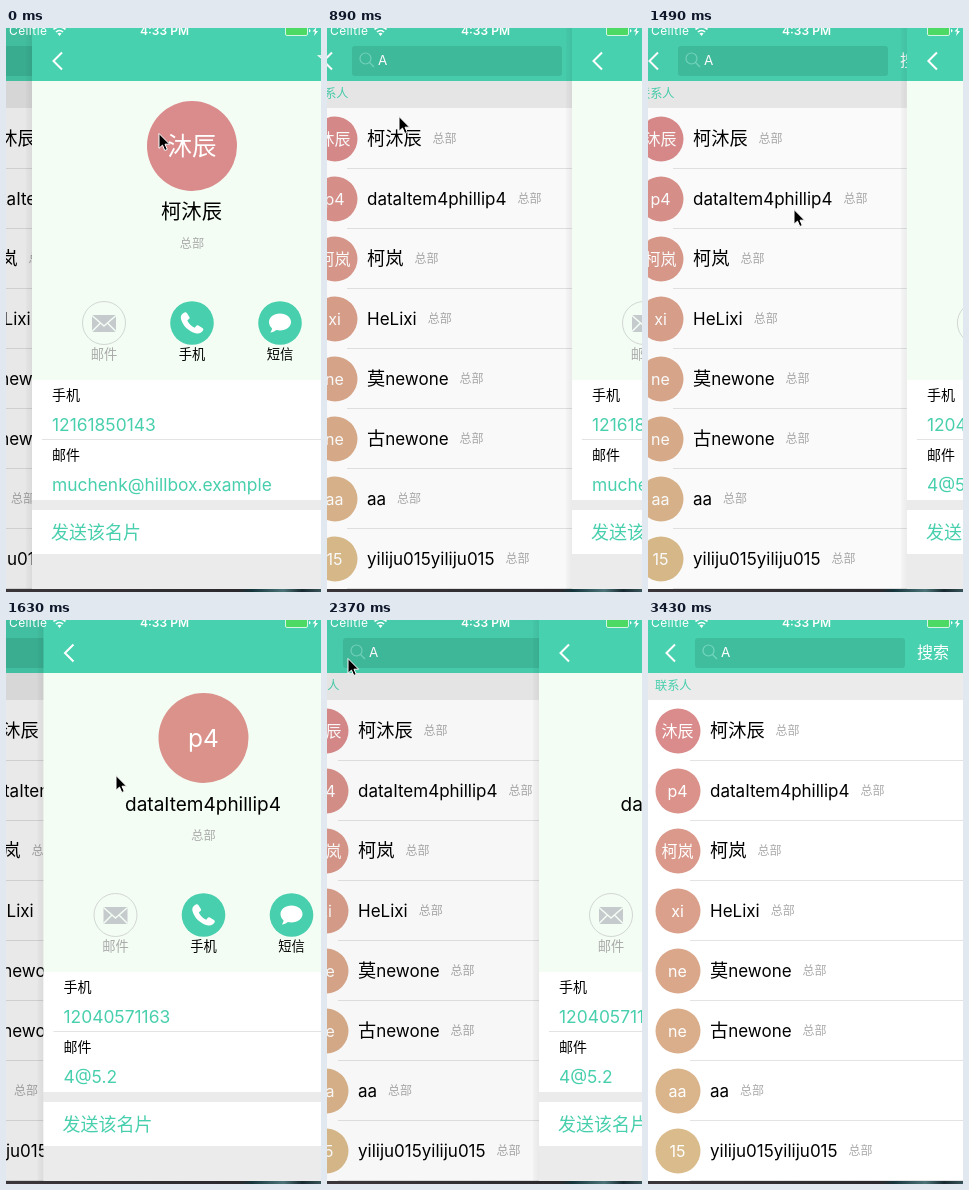
An HTML page that plays this animation: 315 px wide and 564 px high, repeating every 3530 ms.

```html
<!DOCTYPE html>
<html lang="zh-CN">
<head>
<meta charset="utf-8">
<title>联系人</title>
<style>
  html, body { margin: 0; width: 100%; height: 100%; overflow: hidden; }
  body { font-family: Inter, "Noto Sans CJK SC", "Noto Sans CJK", sans-serif; background: #343034; }
  #stage { position: absolute; left: 0; top: 0; width: 315px; height: 564px; overflow: hidden;
    background: linear-gradient(90deg, #3b3639, #2b292d 74%, #14343b 78%, #4b7478 88%, #17292f 94%, #38535a); }
  #screen { position: absolute; inset: 0 0 3px; overflow: hidden; background: #fff; }
  .page { position: absolute; left: 0; top: 0; width: 317px; height: 561px; }
  .box, .t, .page svg { position: absolute; }
  .t { line-height: 1; white-space: nowrap; transform: translateY(-50%); }
  .mid { transform: translate(-50%, -50%); }
  b { font-weight: 400; font-size: 1.07em; line-height: 0; }
  .bar { left: -3px; right: 0; top: 0; height: 53px; background: #48d1af; }
  .teal { color: #48cfad; }
  .grey { color: #aaa; }
  .white { color: #fff; }
  .disc { border-radius: 50%; transform: translate(-50%, -50%); color: #fff;
    display: flex; align-items: center; justify-content: center; line-height: 1; }
  .row .t { display: flex; align-items: center; gap: 11px; left: 62px; font-size: 17px; }
  .row small { font-size: 12px; color: #aaa; }
  .row .disc { left: 29.5px; width: 45px; height: 45px; font-size: 16px; }
  .line { height: 1px; right: 0; background: #e3e3e5; }
  #dim { inset: 0 0 0 -3px; background: #000; }
  #detail::before { content: ""; position: absolute; left: -9px; width: 6px; top: 0; bottom: 0;
    background: linear-gradient(90deg, rgba(0, 0, 0, .02), rgba(0, 0, 0, .06)); }
  #face { left: 157px; top: 118px; width: 90px; height: 90px; font-size: 24.5px; }
  #cursor, #status { position: absolute; left: 0; top: 0; overflow: visible; }
</style>
</head>
<body>
<div id="stage">
  <div id="screen">
    <div class="page" id="list">
      <div class="box" style="left:-3px;right:0;top:53px;bottom:0;background:#fff"></div>
      <div class="box bar"></div>
      <div class="box" style="left:47px;top:18px;width:210px;height:30px;border-radius:3px;background:#3fbd9d"></div>
      <svg width="317" height="53" fill="none" stroke="#fff">
        <path d="M27 24.5 18.5 33 27 41.5" stroke-width="2"/>
        <g stroke="#75d6be" stroke-width="1.2"><circle cx="60.5" cy="30.5" r="5.5"/><path d="M64.5 34.5 69 39"/></g>
      </svg>
      <span class="t white" style="left:73px;top:33px;font-size:13.5px">A</span>
      <span class="t white" style="left:269px;top:32px;font-size:16px">搜索</span>
      <div class="box" style="left:-3px;right:0;top:53px;height:27px;background:#ebebeb"></div>
      <span class="t teal" style="left:7px;top:66px;font-size:12.2px">联系人</span>
      <div id="rows"></div>
      <div class="box" id="dim"></div>
    </div>

    <div class="page" id="detail">
      <div class="box" style="left:-3px;right:0;top:53px;height:299px;background:#f3fdf4"></div>
      <div class="box" style="left:-3px;right:0;top:352px;bottom:0;background:#ebebeb"></div>
      <div class="box" style="left:-3px;right:0;top:352px;height:120px;background:#fff"></div>
      <div class="box" style="left:-3px;right:0;top:482px;height:44px;background:#fff"></div>
      <div class="box line" style="left:7px;top:411px"></div>
      <div class="box bar"></div>
      <div class="box disc" id="face"></div>
      <span class="t mid" id="name" style="left:156.5px;top:184px;font-size:19px"></span>
      <span class="t mid grey" style="left:157px;top:216px;font-size:12.2px">总部</span>
      <svg width="317" height="352" fill="none">
        <path d="M27 24.5 18.5 33 27 41.5" stroke="#fff" stroke-width="2"/>
        <path id="star" stroke="#fff" stroke-width="1.2"/>
        <circle cx="69" cy="295" r="21.5" stroke="#d2d6d4"/>
        <rect x="57" y="287" width="24" height="17" fill="#c5cacd"/>
        <path d="M57 287.5 69 298 81 287.5M57 303.5 65.5 295M81 303.5 72.5 295" stroke="#f3fdf4" stroke-width="1.5"/>
        <g fill="#48cfad"><circle cx="157" cy="295" r="21.8"/><circle cx="245" cy="295" r="21.8"/></g>
        <path fill="#fff" d="M149.5 284.5c-3 1.2-4.3 3.8-3.3 7.3 2 6.500 7.600 11.600 14.400 13.500 3.500.9 6.400-.4 7.600-3.200.4-1 .1-1.700-.8-2.200l-4-2.300c-.9-.5-1.700-.3-2.300.5l-1.300 1.600c-3.400-1.300-6.100-3.900-7.500-7.200l1.600-1.400c.7-.6.9-1.400.5-2.200l-2.400-3.700c-.6-.9-1.400-1.200-2.500-.7z"/>
        <path fill="#fff" d="M245 285.500c6.300 0 11 3.700 11 8.500s-4.700 8.500-11 8.500c-1.300 0-2.500-.2-3.700-.5-1.700 1.400-3.800 2.300-6 2.500 1-1.200 1.600-2.600 1.700-4.200-1.900-1.600-3-3.800-3-6.300 0-4.800 4.700-8.500 11-8.500z"/>
      </svg>
      <div id="captions" style="font-size:13.3px"></div>
      <span class="t" style="left:17px;top:367px;font-size:14px">手机</span>
      <span class="t teal" id="phone" style="left:17px;top:397px;font-size:17.4px"></span>
      <span class="t" style="left:17px;top:427px;font-size:14px">邮件</span>
      <span class="t teal" id="mail" style="left:17px;top:457px;font-size:17.4px"></span>
      <span class="t teal" style="left:16px;top:505px;font-size:18px">发送该名片</span>
    </div>

    <span class="t white" style="left:3px;top:3px;font-size:12px;letter-spacing:.4px">Celltie</span>
    <span class="t mid white" style="left:158.5px;top:3px;font-size:12px;font-weight:600">4:33 PM</span>
    <svg id="status" width="315" height="12" fill="none">
      <path d="M47.5 1.500a8.500 8.500 0 0 1 12 0M50 4a5 5 0 0 1 7 0" stroke="#fff" stroke-width="1.7"/>
      <path d="M51.5 5.500 53.5 8 55.5 5.500q-2-1.500-4 0z" fill="#fff"/>
      <rect x="279.5" y="-3" width="22" height="10.500" rx="1.5" fill="#4cd964" stroke="#d5f6e5"/>
      <path d="M303 1v3.500q1.500-.5 1.500-1.750T303 1z" fill="#fff"/>
      <path d="M310.5-1 306.5 3.500H309L308 8 312 3H309.500z" fill="#fff"/>
    </svg>
  </div>
  <svg id="cursor" width="13" height="19">
    <path d="M0 .5V15.300L3.500 12.100 5.800 17.500 8.300 16.400 6 11.200H10.600z" fill="#000" stroke="#fff"/>
  </svg>
</div>

<script>
const $ = id => document.getElementById(id);
const LOOP = 3530, WIDTH = 320, TAU = 75;

const hue = i => `hsl(${i * 5.2} 51% 70%)`;
const label = s => s.replace(/[\u4e00-\u9fff]+/g, '<b>$&</b>');

const contacts = [
  ['柯沐辰', '沐辰'], ['dataItem4phillip4', 'p4'], ['柯岚', '柯岚'], ['HeLixi', 'xi'],
  ['莫newone', 'ne'], ['古newone', 'ne'], ['aa', 'aa'], ['yiliju015yiliju015', '15']
];
const cards = [
  { row: 0, phone: '12161850143', mail: 'muchenk@hillbox.example' },
  { row: 1, phone: '12040571163', mail: '4@5.2' }
];

$('rows').innerHTML = contacts.map(([name, tag], i) => {
  const y = 110 + 60 * i;
  return `<div class="row">
    <div class="box disc" style="top:${y + .5}px;background:${hue(i)}">${tag}</div>
    <div class="t" style="top:${y + .5}px"><span>${label(name)}</span><small>总部</small></div>
    <div class="box line" style="left:42px;top:${y + 30}px"></div></div>`;
}).join('');

$('captions').innerHTML = ['邮件', '手机', '短信'].map((s, i) =>
  `<span class="t mid ${i ? '' : 'grey'}" style="left:${69 + 88 * i}px;top:327px">${s}</span>`).join('');

$('star').setAttribute('d', 'M' + Array.from({ length: 10 }, (_, i) => {
  const a = i * Math.PI / 5, r = i % 2 ? 4.8 : 12;
  return [295 + r * Math.sin(a), 31.5 - r * Math.cos(a)].map(v => v.toFixed(1));
}).join('L') + 'Z');

// Screen refreshes: time, pointer x, pointer y
const ticks = [
  [0, 153, 105], [150, 112, 76], [300, 66, 44], [450, 50, 27], [600, 14, 29], [750, 12, 31],
  [890, 72, 88], [1040, 112, 135], [1190, 140, 172], [1340, 146, 181], [1490, 146, 181],
  [1630, 110, 155], [1780, 52, 88], [1930, 21, 48], [2080, 21, 38], [2370, 21, 38],
  [2520, 90, 140], [2670, 215, 330], [2820, 303, 475], [2970, 297, 498], [3120, -40, -40]
];

// Page slides: start, time at which `left` pixels remain, direction, card
const slides = [
  { start: 0, at: 0, left: 29, push: true, card: 0 },
  { start: 890, at: 890, left: 72, push: false, card: 0 },
  { start: 1490, at: 1630, left: 40.5, push: true, card: 1 },
  { start: 2370, at: 2370, left: 105, push: false, card: 1 }
];

const lastBefore = (items, t, time) => items.filter(item => time(item) <= t).pop();

let shownCard = -1;
function showCard(n) {
  if (n === shownCard) return;
  shownCard = n;
  const { row, phone, mail } = cards[n], [name, tag] = contacts[row];
  $('face').textContent = tag;
  $('face').style.background = hue(row);
  $('name').innerHTML = label(name);
  $('phone').textContent = phone;
  $('mail').textContent = mail;
}

const move = (id, x, y = 0) => { $(id).style.transform = `translate(${x}px, ${y}px)`; };

function draw(now) {
  const [t, px, py] = lastBefore(ticks, now % LOOP, k => k[0]);
  const s = lastBefore(slides, t, k => k.start);
  let rest = s.left * Math.exp((s.at - t) / TAU);
  if (rest < 1) rest = 0;
  const x = s.push ? rest : WIDTH - rest;
  const covered = 1 - x / WIDTH;

  showCard(s.card);
  move('detail', x);
  $('detail').style.visibility = covered ? 'visible' : 'hidden';
  move('list', Math.round(-.3 * WIDTH * covered));
  $('dim').style.opacity = .1 * covered;
  move('cursor', px, py);
}

const begin = performance.now();
function loop() {
  draw(performance.now() - begin);
  requestAnimationFrame(loop);
}
loop();
</script>
</body>
</html>
```
